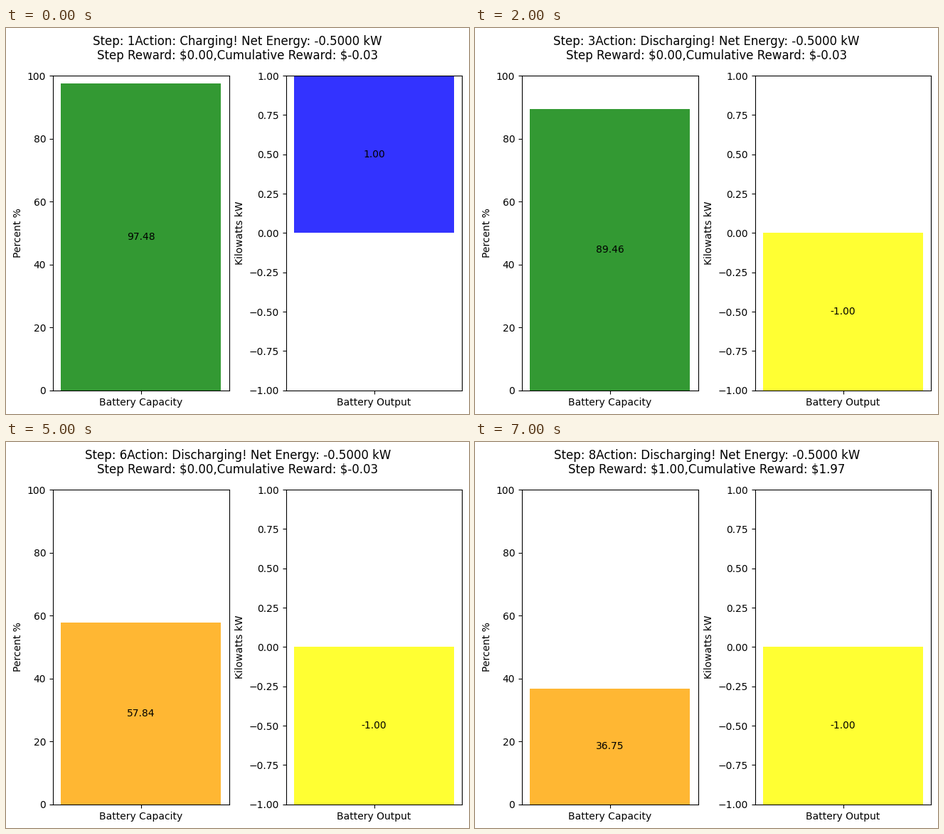
A matplotlib script for the animation above (8000 ms loop, 651 px wide and 543 px high).

```python
import matplotlib.pyplot as plt
from matplotlib.animation import FuncAnimation

W, H, DPI = 651, 543, 100
BOTTOM, TOP, PANEL_W = 33.2, 475.9, 247.6  # px, y upward
STEPS = 8
DRAIN = 10 / 0.9 ** 0.5  # percent lost per step at full output
LOAD = 1.5               # kW

plt.rcParams["font.family"] = "DejaVu Sans"
fig = plt.figure(figsize=(W / DPI, H / DPI), dpi=DPI)


def panel(left, name, ylabel, ylim):
    ax = fig.add_axes([left / W, BOTTOM / H, PANEL_W / W, (TOP - BOTTOM) / H])
    bar = ax.bar([name], [1], alpha=0.8)[0]
    ax.set_ylim(*ylim)
    ax.set_ylabel(ylabel)
    label = ax.text(0, 0, "", ha="center", va="center")
    return bar, label


capacity = panel(66, "Battery Capacity", "Percent %", (0, 100))
output = panel(393.8, "Battery Output", "Kilowatts kW", (-1, 1))
title = fig.suptitle("", x=325.75 / W, y=533.4 / H)
title.set_parse_math(False)


def state(step):
    """Return charge in percent, output in kW, step reward and total reward."""
    if step == 1:
        charge, power = 97.48, 1.0
    elif step == 2:
        charge, power = 100.0, 0.2661
    else:
        charge, power = 100 - DRAIN * (step - 2), -1.0
    reward = 1.0 if step >= 7 else 0.0
    return charge, power, reward, max(step - 6, 0) - 0.03


def set_bar(part, value, color):
    bar, label = part
    bar.set_height(value)
    bar.set_facecolor(color)
    label.set_y(value / 2)
    label.set_text(f"{value:.2f}")


def update(frame):
    step = frame + 1
    charge, power, reward, total = state(step)
    action = "Charging" if power > 0 else "Discharging"
    title.set_text(
        f"Step: {step}Action: {action}! Net Energy: {abs(power) - LOAD:.4f} kW\n"
        f"Step Reward: ${reward:.2f},Cumulative Reward: ${total:.2f}"
    )
    set_bar(capacity, charge, "green" if charge > 70 else "orange")
    set_bar(output, power, "blue" if power > 0 else "yellow")
    return [title, *capacity, *output]


anim = FuncAnimation(fig, update, frames=STEPS, interval=1000,
                     repeat=True, repeat_delay=0, blit=False)
plt.show()
```
